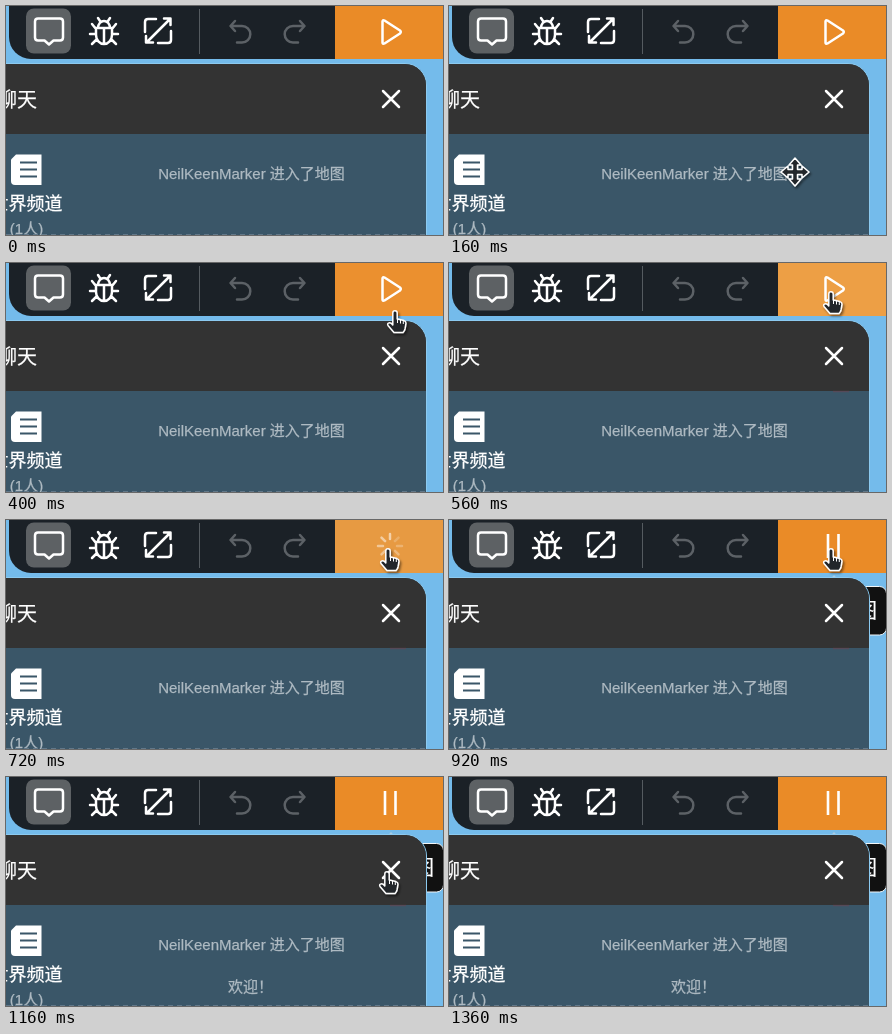
An HTML page for the animation above (1640 ms loop, 437x229 px).

```html
<!DOCTYPE html>
<html lang="zh-CN">
<head>
<meta charset="utf-8">
<style>
  html, body { margin: 0; width: 100%; height: 100%; overflow: hidden; background: #74bbeb; }
  svg { display: block; width: 437px; height: 229px; }
  text {
    font-family: "Liberation Sans", "Noto Sans CJK SC", "Noto Sans CJK", sans-serif;
    fill: #fff; stroke: #fff; stroke-width: .25;
  }
  .line { fill: none; stroke: #fff; stroke-width: 2.5; stroke-linecap: round; stroke-linejoin: round; }
  .dim { stroke: #5c6166; }
  .note { font-size: 15px; fill: #aebac2; stroke: #aebac2; text-anchor: middle; }
  .cursor { fill: #24282c; stroke: #fff; stroke-width: 1.5; stroke-linejoin: round; }
</style>
</head>
<body>
<svg viewBox="0 0 437 229">
  <defs>
    <filter id="shade" x="-50%" y="-50%" width="200%" height="200%">
      <feDropShadow dx="1.5" dy="2" stdDeviation="1.2" flood-opacity=".5"/>
    </filter>
  </defs>
  <rect width="437" height="229" fill="#74bbeb"/>

  <!-- toolbar -->
  <path d="M3 0H329V53H25A22 22 0 0 1 3 31Z" fill="#1b2127"/>
  <rect x="20" y="2.500" width="45" height="45" rx="8" fill="#5d6164"/>
  <path class="line" d="M32 12.500H54Q57 12.500 57 15.500V31.500Q57 34.500 54 34.500H47.500L43 38.500L38.500 34.500H32Q29 34.500 29 31.500V15.500Q29 12.500 32 12.500Z"/>
  <path class="line" d="M90 22H106V29A8 9 0 0 1 90 29ZM92 22A6 7 0 0 1 104 22M98 22V38
    M90 28H84M106 28H112M90 23L86 18M106 23L110 18M91 33L86 38M105 33L110 38M94 15L92 12M102 15L104 12"/>
  <path class="line" d="M150 13H142Q139 13 139 16V26M165 25V34Q165 37 162 37H152
    M141 36L164 13M158 12.500H164.500V19M140 30V36.500H147"/>
  <path d="M193.500 3V48" stroke="#555b60"/>
  <path id="undo" class="line dim" d="M229 15L224.500 20L229 25M225.500 20H236A8.300 8.300 0 0 1 236 36.600H231"/>
  <use href="#undo" transform="matrix(-1 0 0 1 523 0)"/>

  <!-- run button -->
  <rect id="button" x="329" width="108" height="53" fill="#ea8b27"/>
  <path id="play" class="line" d="M376.500 15.500V36.500Q376.500 38.500 378.500 37.500L394 27.500Q395.500 26 394 24.500L378.500 14.500Q376.500 13.500 376.500 15.500Z"/>
  <g id="spinner"></g>
  <path id="pause" d="M379 14V38M389.500 14V38" stroke="#fff" stroke-width="2.600"/>

  <!-- tooltip under the panel -->
  <g id="tip">
    <path d="M375 66L385 55L395 66Z" fill="#a9cde5"/>
    <rect x="330" y="66.500" width="107.500" height="48.500" rx="7" fill="#111" stroke="#f2f5f7"/>
    <text x="428" y="98" font-size="20" text-anchor="end">结束地图</text>
  </g>

  <!-- chat panel -->
  <path d="M-5 57.500H399A21.500 21.500 0 0 1 420.500 79V235H-5Z" fill="#3a5668" stroke="#8ccaf0"/>
  <path d="M0 58H399A21 21 0 0 1 420 79V128H0Z" fill="#333"/>
  <path id="mark" d="M384 128.500H400" stroke="#71404b" stroke-width="1.500" opacity=".5"/>
  <text x="-9" y="101" font-size="20">聊天</text>
  <path class="line" d="M377 85L393 101M393 85L377 101"/>
  <path d="M10 148.500H35.500V179H9Q5 179 5 175V153.500Z" fill="#fff"/>
  <path d="M14 156.500H31M14 163.500H31M14 170.500H31" stroke="#3a5668" stroke-width="2.200"/>
  <text x="20.500" y="203.500" font-size="18" text-anchor="middle">世界频道</text>
  <text class="note" x="20.500" y="228">(1人)</text>
  <path d="M0 228.500H420" stroke="#627889" stroke-dasharray="5 4"/>
  <text class="note" x="245.500" y="173">NeilKeenMarker 进入了地图</text>
  <text id="welcome" class="note" x="244.500" y="215">欢迎！</text>

  <!-- cursors -->
  <g filter="url(#shade)">
    <g id="move" class="cursor">
      <path d="M0 -14L6 -7H2.500V-2.500H7V-6L14 0L7 6V2.500H2.500V7H6L0 14L-6 7H-2.500V2.500H-7V6L-14 0L-7 -6V-2.500H-2.500V-7H-6Z"/>
    </g>
    <g id="hand" class="cursor">
      <path d="M-2.200 14V2A2.200 2.200 0 0 1 2.200 2V8L9 9.600Q11 10.200 11 12.200L10 18Q9.500 20 8 21.500H-1L-7 14.500Q-8 12.500 -6 11.900Q-4 11.500 -2.200 14Z"/>
      <path d="M2.500 8V12M5.500 9V12.500M8.300 10V13" stroke-width="1"/>
    </g>
  </g>
</svg>
<script>
const LOOP = 1640, TICK = 40;
const $ = id => document.getElementById(id);

// time, x, y of the pointer
const path = [
  [80, 292, 222], [160, 346, 166], [240, 388, 121], [320, 393, 84], [400, 389, 48],
  [480, 384, 33], [560, 382, 29], [920, 382, 29], [1000, 382, 48], [1080, 381, 80],
  [1160, 381, 95], [1200, 359, 124], [1280, 299, 188], [1360, 250, 250]
];

const spokes = 8;
$('spinner').innerHTML = Array.from({ length: spokes }, (_, i) =>
  `<path class="line" d="M384 19V14" transform="rotate(${i * 360 / spokes} 384 26)"/>`).join('');

const show = (id, on) => { $(id).style.display = on ? '' : 'none'; };
const mix = (a, b, k) => a + (b - a) * k;

function pointer(t) {
  const i = path.findIndex(p => p[0] > t);
  if (i < 1) return null;
  const [a, b] = [path[i - 1], path[i]];
  const k = (t - a[0]) / (b[0] - a[0]);
  return [mix(a[1], b[1], k), mix(a[2], b[2], k)];
}

function buttonColor(t) {
  const k = t < 840 ? Math.min(1, Math.max(0, (t - 360) / 160)) : 0;
  const peak = t < 640 ? [237, 159, 69] : [231, 154, 66];
  return `rgb(${[234, 139, 39].map((c, i) => Math.round(mix(c, peak[i], k)))})`;
}

function draw(now) {
  const t = Math.floor(now % LOOP / TICK) * TICK;
  const p = pointer(t);
  const onLink = p && p[1] < 107;
  show('hand', onLink);
  show('move', p && !onLink);
  if (p) $(onLink ? 'hand' : 'move').setAttribute('transform', `translate(${p})`);

  $('button').setAttribute('fill', buttonColor(t));
  show('play', t < 640);
  show('spinner', t >= 640 && t < 840);
  show('pause', t >= 840);
  show('tip', t >= 880);
  show('mark', t >= 480);
  show('welcome', t >= 1040);

  const head = Math.floor(t / 80);
  [...$('spinner').children].forEach((s, i) => {
    s.style.opacity = 0.2 + 0.4 * ((i - head + 10 * spokes) % spokes) / spokes;
  });
}

const start = performance.now();
function frame() {
  draw(performance.now() - start);
  requestAnimationFrame(frame);
}
frame();
</script>
</body>
</html>
```
